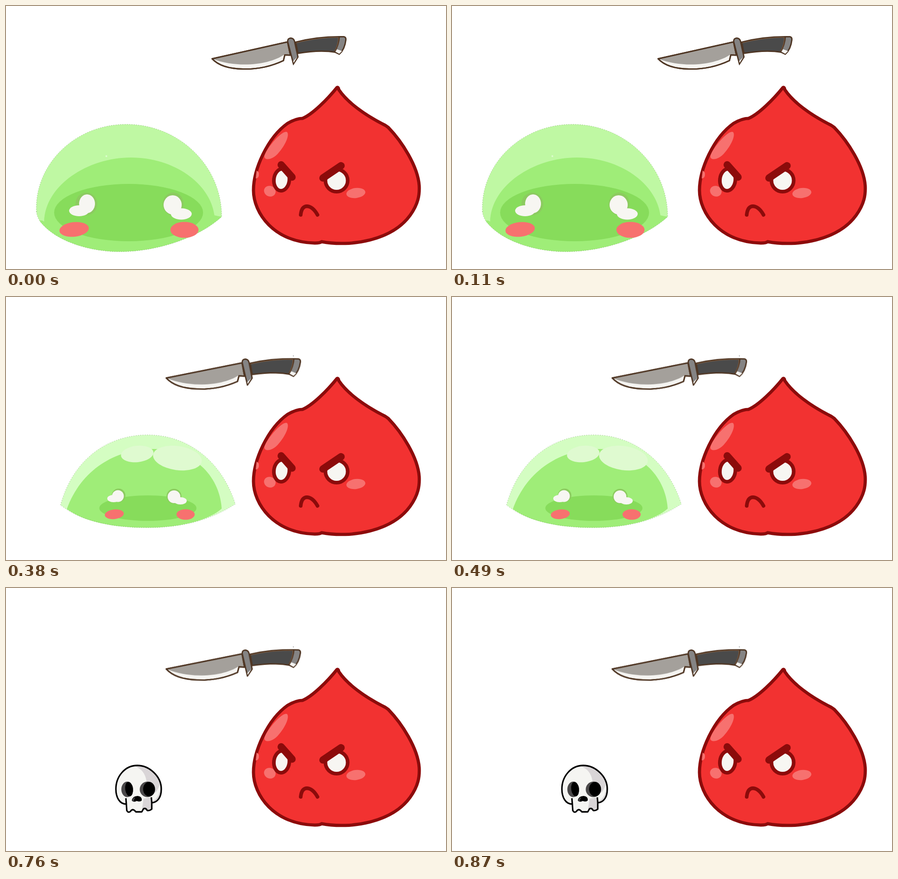
An HTML page for the animation above (950 ms loop, 969 by 578 pixels).

```html
<!DOCTYPE html>
<html lang="en">
<head>
<meta charset="utf-8">
<title>Knife and slimes</title>
<style>
  html, body { margin: 0; width: 100%; height: 100%; overflow: hidden; background: #fff; }
  svg { display: block; width: 969px; height: 578px; }
  .pose { opacity: 0; }
  .pale { fill: #bff8a3; }
  .paler { fill: #d4fdc2; }
  .mid { fill: #9fed78; }
  .deep { fill: #87dc5b; }
  .ring { fill: #8ccb60; }
  .white { fill: #f7f6f2; }
  .blush { fill: #f7716f; }
  .shine { fill: #dffad0; }
  .edge { fill: none; stroke: #6f8f63; stroke-width: 1; stroke-dasharray: 1 4; }
  .line { fill: none; stroke: #8c0b0b; stroke-width: 8; stroke-linecap: round; stroke-linejoin: round; }
  .brow { stroke-width: 16; }
  .body { fill: #f23231; stroke-width: 7; }
  .eye { fill: #f7f6f2; }
  #knife { stroke: #4f3624; stroke-width: 3; stroke-linejoin: round; }
  #knife .flat { stroke: none; }
</style>
</head>
<body>
<svg viewBox="0 0 969 578">
  <g id="tall" class="pose">
    <path class="pale" d="M67 452C62 350 150 260 265 260C380 260 475 350 475 463C430 505 340 540 250 540C190 540 110 520 74 472Q68 462 67 452Z"/>
    <path class="mid" d="M74 472Q80 470 84 474C86 394 180 333 275 333C370 333 450 390 459 460Q467 462 475 463C430 505 340 540 250 540C190 540 110 520 74 472Z"/>
    <ellipse class="deep" cx="270" cy="454" rx="164" ry="63"/>
    <path class="edge" d="M67 452C62 350 150 260 265 260C380 260 475 350 475 463C430 505 340 540 250 540C190 540 110 520 74 472Q68 462 67 452Z"/>
    <circle cx="221" cy="330" r="2" fill="#dcfdcd"/>
    <ellipse class="ring" cx="177" cy="435" rx="24" ry="25"/>
    <ellipse class="white" cx="178.500" cy="434.500" rx="17.500" ry="20.500"/>
    <ellipse class="white" cx="161" cy="450" rx="22" ry="12"/>
    <ellipse class="ring" cx="368" cy="435" rx="23" ry="25"/>
    <ellipse class="white" cx="367" cy="437" rx="20" ry="21"/>
    <ellipse class="white" cx="386" cy="457" rx="23" ry="12.500"/>
    <ellipse class="blush" cx="150" cy="491" rx="32.500" ry="16" transform="rotate(-6 150 491)"/>
    <ellipse class="blush" cx="393" cy="492" rx="31" ry="17.500"/>
  </g>

  <g id="low" class="pose">
    <path class="paler" d="M120 457C150 350 230 303 312 303C400 303 475 360 505 455C450 490 390 507 310 507C230 507 160 490 120 457Z"/>
    <path class="mid" d="M134 466C165 380 240 334 325 334C410 334 470 390 475 465C450 488 390 507 310 507C235 507 172 494 134 466Z"/>
    <path class="edge" d="M120 457C150 350 230 303 312 303C400 303 475 360 505 455C450 490 390 507 310 507C230 507 160 490 120 457Z"/>
    <ellipse class="shine" cx="289" cy="345" rx="36" ry="18" transform="rotate(-6 289 345)"/>
    <ellipse class="shine" cx="377.500" cy="354" rx="54" ry="26.500" transform="rotate(8 377.500 354)"/>
    <ellipse class="deep" cx="312.500" cy="464" rx="107" ry="28"/>
    <circle class="ring" cx="248" cy="436" r="15"/>
    <circle class="white" cx="246.500" cy="437.500" r="13"/>
    <ellipse class="white" cx="237" cy="443" rx="14" ry="8"/>
    <circle class="ring" cx="370" cy="438" r="16.500"/>
    <circle class="white" cx="370" cy="439" r="14"/>
    <ellipse class="white" cx="384" cy="448" rx="14" ry="8"/>
    <ellipse class="blush" cx="238.500" cy="477.500" rx="21" ry="10.500" transform="rotate(-6 238.500 477.500)"/>
    <ellipse class="blush" cx="395.500" cy="478" rx="20" ry="11.500"/>
  </g>

  <g id="puddle" class="pose">
    <path class="paler" d="M132 450C142 424 195 389 230 378C280 367 340 368 390 383C440 395 488 420 488 442C488 462 400 510 295 510C210 510 130 470 132 450Z"/>
    <path class="mid" d="M146 457C146 440 165 431 172 426C215 398 280 385 330 386C400 388 460 430 467 450C465 470 400 508 295 508C210 508 146 480 146 457Z"/>
    <path class="edge" d="M132 450C142 424 195 389 230 378C280 367 340 368 390 383C440 395 488 420 488 442C488 462 400 510 295 510C210 510 130 470 132 450Z"/>
    <ellipse class="deep" cx="308" cy="466.500" rx="91" ry="24.500" transform="rotate(-2 308 466.500)"/>
  </g>

  <g id="skull" class="pose">
    <path fill="#f5f5f2" d="M265 475C250 475 242 460 242 442C242 414 262 390 289 390C316 390 342 414 342 442C342 460 334 471 321 472L321 486Q316 490 311 489Q308 483 303 485L299 492L286 492Q279 483 274 491Q269 495 266 489Z"/>
    <path fill="#d9d5d7" d="M281 391C301 397 308 411 310 428L328 450L321 471C334 469 341 458 341 442C341 414 316 390 281 391ZM303 463L320 460L320 485L311 487L303 484L299 489Z"/>
    <path fill="#f5f5f2" d="M339 429C341 449 334 464 321 470L327 452Q336 443 339 429Z"/>
    <path fill="none" stroke="#000" stroke-width="3.300" stroke-linejoin="round" d="M264 462L265 475C250 475 242 460 242 442C242 414 262 390 289 390C316 390 342 414 342 442C342 460 334 471 321 472L320 460M321 472L321 486Q316 490 311 489Q308 483 303 485L299 492L286 492Q279 483 274 491Q269 495 266 489L265 475"/>
    <ellipse cx="267" cy="442.500" rx="13" ry="17" fill="#4b494a"/>
    <ellipse cx="271" cy="442" rx="8.500" ry="16" transform="rotate(-8 271 442)"/>
    <ellipse cx="311.500" cy="442.500" rx="17" ry="17" fill="#4b494a"/>
    <ellipse cx="315" cy="442" rx="13" ry="16"/>
    <path d="M277 467Q279 457 290 457Q300 458 299 467Q295 471 288 468Q281 472 277 467Z"/>
    <path fill="#4b494a" d="M278 467Q280 460 285 460Q281 465 282 469Z"/>
  </g>

  <g id="red">
    <path class="line body" d="M729 179C708 205 675 238 653 247Q639 247 620 258C575 290 545 360 545 405C545 455 590 519 680 521Q692 521 695 518C760 530 850 515 890 460C908 435 911 415 910 395C907 352 872 298 842 267Q836 262 829 259C790 239 752 212 733 184Q732 178 729 179Z"/>
    <g fill="#f7716f">
      <path d="M619 277C608 271 570 317 569 331C570 341 589 337 600 323C615 306 625 284 619 277Z"/>
      <path d="M552 362Q558 364 557 372Q556 379 550 379Z"/>
      <ellipse cx="581" cy="407" rx="13" ry="11.500" transform="rotate(25 581 407)"/>
      <ellipse cx="770.500" cy="411" rx="21" ry="11" transform="rotate(-7 770.500 411)"/>
    </g>
    <ellipse class="line eye" cx="607" cy="382" rx="17" ry="24" transform="rotate(6 607 382)"/>
    <circle class="line eye" cx="728" cy="383.500" r="24.500"/>
    <path class="line brow" d="M606 349L630 376M698 378L738 351"/>
    <path class="line" d="M649 459Q651 440 663 440Q676 441 686 459"/>
  </g>

  <rect x="632" y="129" width="1.500" height="1" fill="#222"/>

  <g id="knife">
    <g transform="translate(-453 -116)">
      <path fill="#f5f4f1" d="M454 116L620 79L626 108L614 107.500L611 120C575 137 540 139 522 138.500C490 138 468 131 454 116Z"/>
      <path class="flat" fill="#a4a09b" d="M456 116.500L619 80L624 107L614 106C580 130 510 137 456 116.500Z"/>
      <path fill="none" d="M454 116L620 79L626 108L614 107.500L611 120C575 137 540 139 522 138.500C490 138 468 131 454 116Z"/>
      <path fill="#4a4a4a" d="M638 79.500C670 71 702 67.500 734 67.500Q734 84 725 101.500C700 97.500 670 99.500 643 104Z"/>
      <path fill="#858484" d="M734 67.500L744 67.500Q749 68.500 748.500 74C747 88 743 98 734 106L723.500 101Q733 85 734 67.500Z"/>
      <path class="flat" fill="#f5f4f1" d="M729 95L740 99L734 105L725.500 100.500Z"/>
      <path fill="none" stroke="#8a6242" stroke-width="1" d="M639 81C670 73 702 69 732 69Q732 84 724 99"/>
      <path fill="#858484" d="M620.500 79Q619.500 71 627 70.500Q634 71 635.500 78L643 112L633 127.500L628 108Z"/>
      <path class="flat" fill="#f5f4f1" d="M641.500 112L633.500 125L632.500 121Z"/>
    </g>
  </g>
</svg>
<script>
  const STEP = 190, COUNT = 5;
  const el = id => document.getElementById(id);

  // Each value holds for one step, then jumps to the next.
  function play(id, prop, values) {
    const frames = [...values, values[0]].map((v, i) => ({
      [prop]: v, offset: i / COUNT, easing: 'step-end'
    }));
    el(id).animate(frames, { duration: STEP * COUNT, iterations: Infinity });
  }

  const pose = (x, y, turn, size) =>
    `translate(${x}px, ${y}px) rotate(${turn}deg) scale(${size})`;

  const raised = pose(453, 116, 0, 1);
  const stab = pose(395, 277.5, -51.2, 0.915);
  const rest = pose(352, 178, 1.3, 1);

  play('knife', 'transform', [raised, stab, rest, rest, rest]);
  play('tall', 'opacity', [1, 1, 0, 0, 0]);
  play('low', 'opacity', [0, 0, 1, 0, 0]);
  play('puddle', 'opacity', [0, 0, 0, 1, 0]);
  play('skull', 'opacity', [0, 0, 0, 0, 1]);
</script>
</body>
</html>
```
